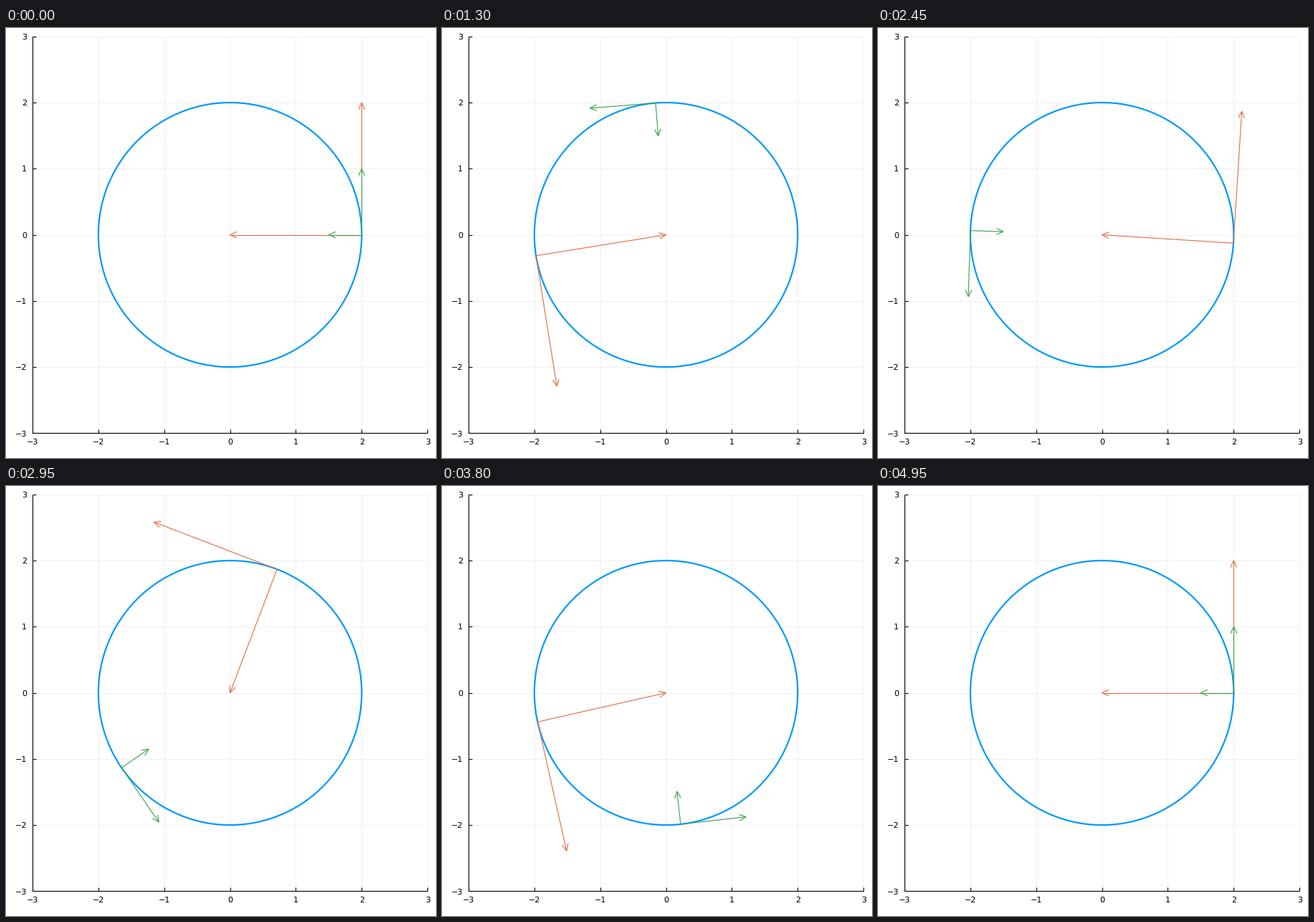
A matplotlib script for the animation above (5 s loop, 600 by 600 pixels).

```python
import numpy as np
import matplotlib.pyplot as plt
from matplotlib.animation import FuncAnimation

SIZE, DPI = 600, 100
FRAMES, INTERVAL = 100, 50
LEFT, RIGHT, TOP, BOTTOM = 37.0, 588.2, 11.8, 565.3
LIM, RADIUS = 3, 2
BLUE, ORANGE, GREEN = "#009AFA", "#E26F46", "#3DA44D"
HEAD_LEN, HEAD_HALF = 9.5, 4.3

plt.rcParams["font.family"] = "DejaVu Sans"
plt.rcParams["text.hinting"] = "none"

fig = plt.figure(figsize=(SIZE / DPI, SIZE / DPI), dpi=DPI, facecolor="white")
ax = fig.add_axes([0, 0, 1, 1])
ax.set_xlim(0, SIZE)
ax.set_ylim(SIZE, 0)
ax.axis("off")


def px(width):
    """Pixels to points."""
    return width * 72 / DPI


def to_stage(x, y):
    """Data coordinates to stage pixels."""
    sx = LEFT + (x + LIM) * (RIGHT - LEFT) / (2 * LIM)
    sy = BOTTOM - (y + LIM) * (BOTTOM - TOP) / (2 * LIM)
    return np.array([sx, sy])


def line(xs, ys, color, width):
    return ax.plot(xs, ys, color=color, lw=px(width), solid_capstyle="butt")[0]


def draw_axes():
    ticks = range(-LIM, LIM + 1)
    for v in ticks:
        x, y = to_stage(v, v)
        line([x, x], [TOP, BOTTOM], "#F0F0F0", 1)
        line([LEFT, RIGHT], [y, y], "#F0F0F0", 1)
    line([LEFT, RIGHT], [BOTTOM, BOTTOM], "black", 1.1)
    line([LEFT, LEFT], [TOP, BOTTOM], "black", 1.1)
    for v in ticks:
        x, y = to_stage(v, v)
        line([x, x], [BOTTOM, BOTTOM - 5], "black", 1.1)
        line([LEFT, LEFT + 5], [y, y], "black", 1.1)
        label = str(v).replace("-", "\u2212")
        ax.text(x, 581, label, size=8, ha="center", va="baseline")
        ax.text(29.3, y + 4.1, label, size=8, ha="right", va="baseline")


class Arrow:
    """A shaft with an open V head."""

    def __init__(self, color):
        self.shaft = line([], [], color, 1.15)
        self.head = line([], [], color, 1.15)
        self.head.set_solid_joinstyle("miter")

    def place(self, start, vector):
        tail = to_stage(*start)
        tip = to_stage(*(start + vector))
        back = (tail - tip) / np.hypot(*(tail - tip))
        side = np.array([-back[1], back[0]]) * HEAD_HALF
        base = tip + back * HEAD_LEN
        self.shaft.set_data(*np.transpose([tail, tip]))
        self.head.set_data(*np.transpose([base + side, tip, base - side]))


class Mover:
    """A point in uniform circular motion with velocity and acceleration."""

    def __init__(self, speed, color):
        self.omega = speed / RADIUS
        self.velocity = Arrow(color)
        self.acceleration = Arrow(color)

    def update(self, t):
        angle = self.omega * t
        pos = RADIUS * np.array([np.cos(angle), np.sin(angle)])
        self.velocity.place(pos, self.omega * np.array([-pos[1], pos[0]]))
        self.acceleration.place(pos, -self.omega ** 2 * pos)


draw_axes()
theta = np.linspace(0, 2 * np.pi, 361)
line(*to_stage(RADIUS * np.cos(theta), RADIUS * np.sin(theta)), BLUE, 2.2)
movers = [Mover(2, ORANGE), Mover(1, GREEN)]


def update(frame):
    t = 4 * np.pi * frame / (FRAMES - 1)
    for mover in movers:
        mover.update(t)
    return []


anim = FuncAnimation(fig, update, frames=FRAMES, interval=INTERVAL,
                     init_func=lambda: update(0), repeat=True)
plt.show()
```
